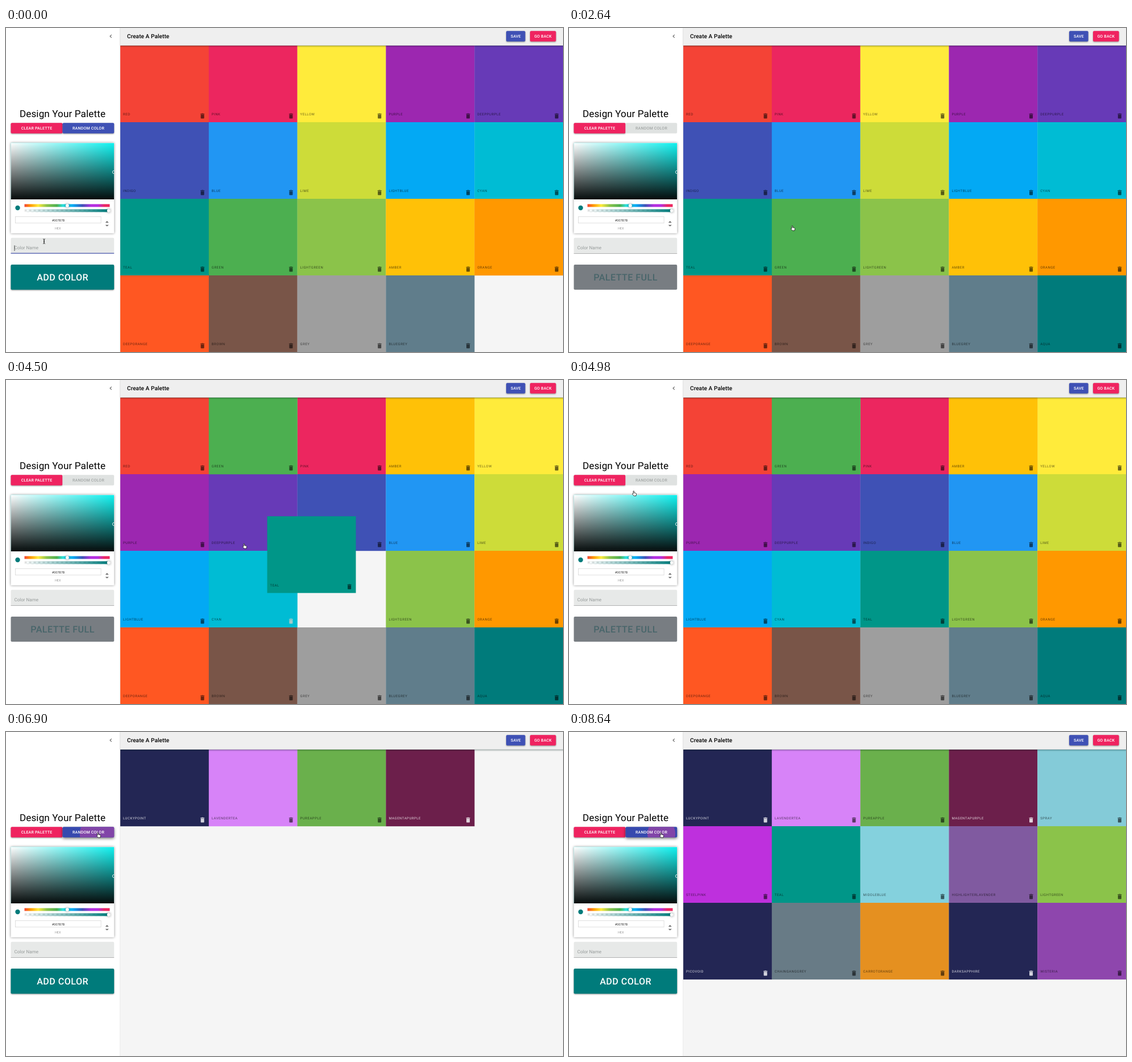
An HTML page for the animation above (8.7 s loop, 980 px wide and 571 px high).

```html
<!DOCTYPE html>
<html lang="en">
<head>
<meta charset="utf-8">
<title>Palette designer</title>
<style>
  html, body { margin: 0; width: 100%; height: 100%; overflow: hidden; background: #fff; }
  svg { display: block; }
  text { font-family: Roboto, Arial, sans-serif; text-rendering: geometricPrecision; }
  .btn { font-size: 7.035px; font-weight: 500; letter-spacing: .2px; fill: #fff; text-anchor: middle; }
  .big { font-size: 16.08px; font-weight: 500; letter-spacing: .46px; text-anchor: middle; }
  .name { font-size: 6.03px; letter-spacing: .5px; }
  .hex { font-size: 5.5px; text-anchor: middle; }
  .field { font-size: 8.04px; }
  .raised { filter: drop-shadow(0 1px 1px rgba(0,0,0,.4)); }
  .hover { filter: drop-shadow(0 2px 2.5px rgba(0,0,0,.55)); }
  .card { filter: drop-shadow(0 .5px 2px rgba(0,0,0,.45)); }
  .bar { filter: drop-shadow(0 1px 1.6px rgba(0,30,25,.5)); }
</style>
</head>
<body>
<svg width="980" height="571" viewBox="0 0 980 571">
  <defs>
    <linearGradient id="white"><stop stop-color="#fff"/><stop offset="1" stop-color="#fff" stop-opacity="0"/></linearGradient>
    <linearGradient id="black" x2="0" y2="1"><stop stop-color="#060c0c" stop-opacity="0"/><stop offset="1" stop-color="#060c0c"/></linearGradient>
    <linearGradient id="hue">
      <stop stop-color="#f44336"/><stop offset=".07" stop-color="#ff9800"/><stop offset=".16" stop-color="#ffeb3b"/>
      <stop offset=".26" stop-color="#8bc34a"/><stop offset=".38" stop-color="#4caf50"/><stop offset=".45" stop-color="#2ce0dc"/>
      <stop offset=".57" stop-color="#03a9f4"/><stop offset=".68" stop-color="#3f51b5"/><stop offset=".78" stop-color="#b52ee0"/>
      <stop offset=".86" stop-color="#b52ee0"/><stop offset=".94" stop-color="#ec265f"/><stop offset="1" stop-color="#ec265f"/>
    </linearGradient>
    <linearGradient id="alpha"><stop stop-color="#007b7b" stop-opacity="0"/><stop offset="1" stop-color="#007b7b"/></linearGradient>
    <pattern id="check" width="8" height="8" x="32.5" y="319.5" patternUnits="userSpaceOnUse">
      <path d="M0 0h4v4H0zM4 4h4v4H4z" fill="#e2e2e2"/>
    </pattern>
    <clipPath id="satClip"><rect x="8.5" y="202.5" width="181.7" height="99.5"/></clipPath>
    <clipPath id="clearClip"><rect x="8.5" y="167.2" width="91" height="18.5" rx="2"/></clipPath>
    <clipPath id="randomClip"><rect x="99.5" y="167.2" width="90.7" height="18.5" rx="2"/></clipPath>
    <clipPath id="addClip"><rect x="8.5" y="417" width="181.7" height="44.2" rx="2"/></clipPath>
    <path id="trash" transform="scale(.5025)" d="M6 19c0 1.1.9 2 2 2h8c1.1 0 2-.9 2-2V7H6v12zM19 4h-3.5l-1-1h-5l-1 1H5v2h14V4z"/>
  </defs>

  <rect x="201" width="779" height="571" fill="#f5f5f5"/>
  <g id="tiles"></g>

  <rect class="bar" x="201" width="790" height="30.7" fill="#efefef"/>
  <text x="213" y="18.2" font-size="10.05" font-weight="500" letter-spacing=".075">Create A Palette</text>
  <rect class="raised" x="880" y="5.3" width="33.6" height="18.4" rx="2" fill="#3f51b5"/>
  <text class="btn" x="897" y="17">SAVE</text>
  <rect class="raised" x="922" y="5.3" width="45.6" height="18.4" rx="2" fill="#ef2360"/>
  <text class="btn" x="944.8" y="17">GO BACK</text>
  <g id="lifted"></g>

  <rect width="200.5" height="571" fill="#fff"/>
  <rect x="200.5" width=".6" height="571" fill="#dcdcdc"/>
  <path transform="translate(178.3 8.5) scale(.5025)" fill="#555" d="M15.41 7.41L14 6l-6 6 6 6 1.41-1.41L10.83 12z"/>
  <text x="99.5" y="157.2" font-size="17.085" letter-spacing=".126" text-anchor="middle">Design Your Palette</text>

  <rect class="raised" x="8.5" y="167.2" width="91" height="18.5" rx="2" fill="#ef2360"/>
  <g clip-path="url(#clearClip)"><circle id="clearRipple" cx="57" cy="178" fill="#fff" opacity=".3"/></g>
  <text class="btn" x="54" y="178.7">CLEAR PALETTE</text>
  <rect id="random" x="99.5" y="167.2" width="90.7" height="18.5" rx="2"/>
  <g clip-path="url(#randomClip)"><circle id="randomRipple" cx="162.5" cy="179" fill="#8a45a8" opacity=".9"/></g>
  <text id="randomText" class="btn" x="145" y="178.7">RANDOM COLOR</text>

  <rect class="card" x="8.5" y="202.5" width="181.7" height="159.3" rx="1" fill="#fff"/>
  <g clip-path="url(#satClip)">
    <rect x="8.5" y="202.5" width="181.7" height="99.5" fill="#10f2f0"/>
    <rect x="8.5" y="202.5" width="181.7" height="99.5" fill="url(#white)"/>
    <rect x="8.5" y="202.5" width="181.7" height="99.5" fill="url(#black)"/>
    <circle cx="190" cy="254" r="2.7" fill="none" stroke="#fff" stroke-width=".8"/>
  </g>
  <circle cx="20.5" cy="317" r="4.2" fill="#007b7b"/>
  <rect x="32.5" y="310.4" width="150" height="5" fill="url(#hue)"/>
  <rect x="32.5" y="319.4" width="150" height="5" fill="url(#check)"/>
  <rect x="32.5" y="319.4" width="150" height="5" fill="url(#alpha)"/>
  <circle class="card" cx="107.8" cy="312.9" r="3" fill="#f8f8f8"/>
  <circle class="card" cx="180.7" cy="322" r="3" fill="#f8f8f8"/>
  <rect x="16.5" y="332.5" width="150.6" height="11.3" fill="#fff" stroke="#d2d2d2" stroke-width=".7"/>
  <text class="hex" x="92" y="340.6" fill="#333">#007B7B</text>
  <text class="hex" x="91.2" y="354.7" fill="#969696">HEX</text>
  <path transform="translate(171.7 339) scale(.5025)" fill="#222" d="M12 5.83L15.17 9l1.41-1.41L12 3 7.41 7.59 8.83 9zM12 18.17L8.83 15l-1.41 1.41L12 21l4.59-4.59L15.17 15z"/>

  <path d="M8.5 397.5v-25.7a2 2 0 0 1 2-2h177.7a2 2 0 0 1 2 2v25.7z" fill="#e7e9e8"/>
  <rect id="line" x="8.5" width="181.7"/>
  <text id="entry" class="field" x="14.5" y="390.4"></text>
  <rect id="caret" y="383" width=".8" height="10" fill="#222"/>

  <rect id="add" x="8.5" y="417" width="181.7" height="44.2" rx="2"/>
  <g clip-path="url(#addClip)"><circle id="addRipple" cx="104" cy="440" fill="#fff" opacity=".3"/></g>
  <text id="addText" class="big" x="99.6" y="445"></text>

  <g id="cursor">
    <path id="ibeam" d="M-2-4.2q2 0 2 1v6.4q0 1-2 1M2-4.2q-2 0-2 1v6.4q0 1 2 1M-1 0h2" fill="none" stroke="#222" stroke-width=".8"/>
    <path id="arrow" d="M0 0v8.2l1.9-1.7 1.3 2.8 1.3-.6-1.3-2.7h2.6z" fill="#111" stroke="#fff" stroke-width=".6"/>
    <path id="hand" transform="translate(-2.4 0)" d="M1.9 1.2c0-1.2 1.6-1.2 1.6 0v2.4l2.9.6c.8.2 1.1.8 1 1.6L6.9 9H3.1L.5 6.2c-.6-.9.4-1.5 1.1-.9l.3.3z" fill="#fff" stroke="#111" stroke-width=".8"/>
  </g>
</svg>

<script>
const LOOP = 8700, STEP = 60;
const $ = id => document.getElementById(id);
const set = (el, attrs) => { for (const k in attrs) el.setAttribute(k, attrs[k]); };
const show = (el, on) => { el.style.display = on ? '' : 'none'; };
const mix = (a, b, p) => a.map((v, i) => v + (b[i] - v) * p);

const FIRST = `red #f44336,pink #ec265f,yellow #ffeb3b,purple #9c27b0,deeppurple #673ab7,indigo #3f51b5,blue #2196f3,
lime #cddc39,lightblue #03a9f4,cyan #00bcd4,teal #009688,green #4caf50,lightgreen #8bc34a,amber #ffc107,orange #ff9800,
deeporange #ff5722,brown #795548,grey #9e9e9e,bluegrey #607d8b,aqua #007b7b`;
const SECOND = `luckypoint #232654 w,lavendertea #d783f8,pureapple #6ab04c,magentapurple #6c1f4b w,spray #84cbd8,
steelpink #be30dd,teal #009688,middleblue #84d1dd,highlighterlavender #805aa0,lightgreen #8bc34a,picovoid #232654 w,
chainganggrey #687b86,carrotorange #e59020,darksapphire #232654 w,wisteria #8e46ad`;

const SUBMIT = 1880, CLEAR = 5340, SETTLE = 300;
const addTime = i => 6340 + 160 * i;

function makeTile(spec) {
  const [name, color, light] = spec.trim().split(' ');
  const g = document.createElementNS('http://www.w3.org/2000/svg', 'g');
  const ink = light ? 'rgba(255,255,255,.8)' : 'rgba(0,0,0,.58)';
  g.innerHTML = `<rect width="156" height="135.2" fill="${color}"/>
    <text class="name" x="5" y="123.4" fill="${ink}">${name.toUpperCase()}</text>
    <use href="#trash" x="138.6" y="118" fill="${ink}"/>`;
  $('tiles').append(g);
  return { name, g };
}
const tiles = FIRST.split(',').map(makeTile);
const extras = SECOND.split(',').map(makeTile);
const slotPos = s => [201 + 155.8 * (s % 5), 31 + 135 * Math.floor(s / 5)];
const place = (el, [x, y]) => set(el, { transform: `translate(${x} ${y})` });
extras.forEach((e, i) => place(e.g, slotPos(i)));

// Reorders: time, tile name, new slot
const moves = [[2860, 'green', 6], [3040, 'green', 1], [3680, 'amber', 8], [3820, 'amber', 3]];
const orders = [tiles.map(t => t.name)];
for (const [, name, slot] of moves) {
  const next = orders.at(-1).filter(n => n !== name);
  next.splice(slot, 0, name);
  orders.push(next);
}

// Drags: tile name, pick up, release
const drags = [['green', 2760, 3360], ['amber', 3540, 3960], ['teal', 4260, 4410]];

// Pointer: time, x, y, shape
const path = [
  [0, 67, 376, 'ibeam'], [60, 67, 376, ''], [1560, 67, 376, 'ibeam'], [1680, 80, 400, 'arrow'], [1800, 104, 440, 'hand'],
  [2040, 104, 440, 'arrow'], [2280, 250, 390, 'hand'], [2520, 392.5, 348, 'hand'], [2640, 392.5, 348, 'hand'],
  [2760, 406.8, 340.5, 'arrow'], [3240, 444, 69, 'arrow'], [3360, 430, 80, 'hand'], [3540, 735, 380, 'arrow'],
  [3900, 735, 110, 'arrow'], [3960, 735, 110, 'hand'], [4080, 735, 110, 'hand'], [4200, 502, 424, 'hand'],
  [4260, 527.5, 413, 'arrow'], [4410, 418.5, 288, 'hand'], [4620, 418.5, 288, 'hand'], [5100, 57, 178, 'hand'],
  [5640, 57, 178, 'hand'], [5880, 140, 190, 'arrow'], [6000, 172, 187, 'arrow'], [6060, 172, 187, 'arrow'],
  [6180, 161.5, 177, 'hand'], [LOOP, 161.5, 177, 'hand']];
const typed = [[0, ''], [420, 'A'], [720, 'Aq'], [780, 'Aqu'], [960, 'Aqua']];

// CSS "ease": cubic-bezier(.25, .1, .25, 1)
function ease(x) {
  if (x <= 0) return 0;
  if (x >= 1) return 1;
  const curve = (a, b, u) => 3 * a * u * (1 - u) ** 2 + 3 * b * u * u * (1 - u) + u ** 3;
  let lo = 0, hi = 1;
  for (let i = 0; i < 20; i++) {
    const mid = (lo + hi) / 2;
    if (curve(.25, .25, mid) < x) lo = mid; else hi = mid;
  }
  return curve(.1, 1, lo);
}

function pointer(t) {
  let i = path.findLastIndex(k => k[0] <= t);
  const a = path[i], b = path[Math.min(i + 1, path.length - 1)];
  const p = b === a ? 0 : (t - a[0]) / (b[0] - a[0]);
  return { at: mix(a.slice(1, 3), b.slice(1, 3), p * p * (3 - 2 * p)), shape: a[3] };
}

function shifted(name, t, k = moves.length) {
  while (k && moves[k - 1][0] > t) k--;
  const goal = slotPos(orders[k].indexOf(name));
  if (!k) return goal;
  const start = moves[k - 1][0];
  return mix(shifted(name, start, k - 1), goal, ease((t - start) / SETTLE));
}

function dragged(name, t, from, to) {
  const home = slotPos(orders[moves.filter(m => m[0] <= from).length].indexOf(name));
  const grab = pointer(from).at, now = pointer(Math.min(t, to)).at;
  const held = home.map((v, i) => v + now[i] - grab[i]);
  const end = slotPos(orders[moves.filter(m => m[0] <= to).length].indexOf(name));
  return mix(held, end, ease((t - to) / SETTLE));
}

function drawTiles(t) {
  tiles.forEach(({ name, g }) => {
    show(g, t < CLEAR && (name !== 'aqua' || t >= SUBMIT));
    const drag = drags.find(d => d[0] === name && t >= d[1] && t < d[2] + SETTLE);
    place(g, drag ? dragged(name, t, drag[1], drag[2]) : shifted(name, t));
    const layer = $(drag ? 'lifted' : 'tiles');
    if (g.parentNode !== layer) {
      const next = drag ? null : tiles.slice(tiles.findIndex(x => x.name === name) + 1).find(x => x.g.parentNode === layer);
      layer.insertBefore(g, next ? next.g : null);
    }
    if (name === 'cyan') set(g.lastElementChild, { fill: t >= 4200 && t < 4620 ? 'rgba(190,205,200,.85)' : 'rgba(0,0,0,.58)' });
  });
  extras.forEach((e, i) => show(e.g, t >= addTime(i)));
}

function drawSidebar(t) {
  const full = t >= SUBMIT && t < CLEAR, focus = t < SUBMIT, over = t >= 6180;
  set($('random'), { fill: full ? '#dfe2e1' : over ? '#3649ae' : '#3f51b5', class: full ? '' : over ? 'hover' : 'raised' });
  $('randomText').style.fill = full ? '#a3a7a6' : '#fff';
  set($('add'), { fill: full ? '#787d82' : '#007b7b', class: full ? '' : 'raised' });
  set($('addText'), { fill: full ? '#48656a' : '#fff' });
  $('addText').textContent = full ? 'PALETTE FULL' : 'ADD COLOR';

  const value = focus ? typed.findLast(k => k[0] <= t)[1] : '';
  $('entry').textContent = value || 'Color Name';
  set($('entry'), { fill: value ? '#111' : '#969b9a' });
  set($('line'), focus ? { y: 396.5, height: 1.1, fill: '#3443a5' } : { y: 397, height: .6, fill: '#858585' });
  set($('caret'), { x: 14.6 + (value ? $('entry').getComputedTextLength() : 0) });
  show($('caret'), focus && !(t >= 120 && t < 420) && t < 1440);

  const ripple = (id, age, speed, life) => set($(id), { r: age >= 0 && age < life ? age * speed : 0 });
  ripple('addRipple', t - 1840, .4, 240);
  ripple('clearRipple', t - CLEAR + 20, .3, 240);
  const count = extras.filter((e, i) => t >= addTime(i)).length;
  ripple('randomRipple', count ? t - addTime(count - 1) : -1, .41, 115);
}

function draw(t) {
  drawTiles(t);
  drawSidebar(t);
  const { at, shape } = pointer(t);
  place($('cursor'), at);
  for (const id of ['ibeam', 'arrow', 'hand']) show($(id), id === shape);
}

const begin = performance.now();
function tick() {
  const t = (performance.now() - begin) % LOOP;
  draw(Math.floor(t / STEP) * STEP);
  requestAnimationFrame(tick);
}
tick();
</script>
</body>
</html>
```
